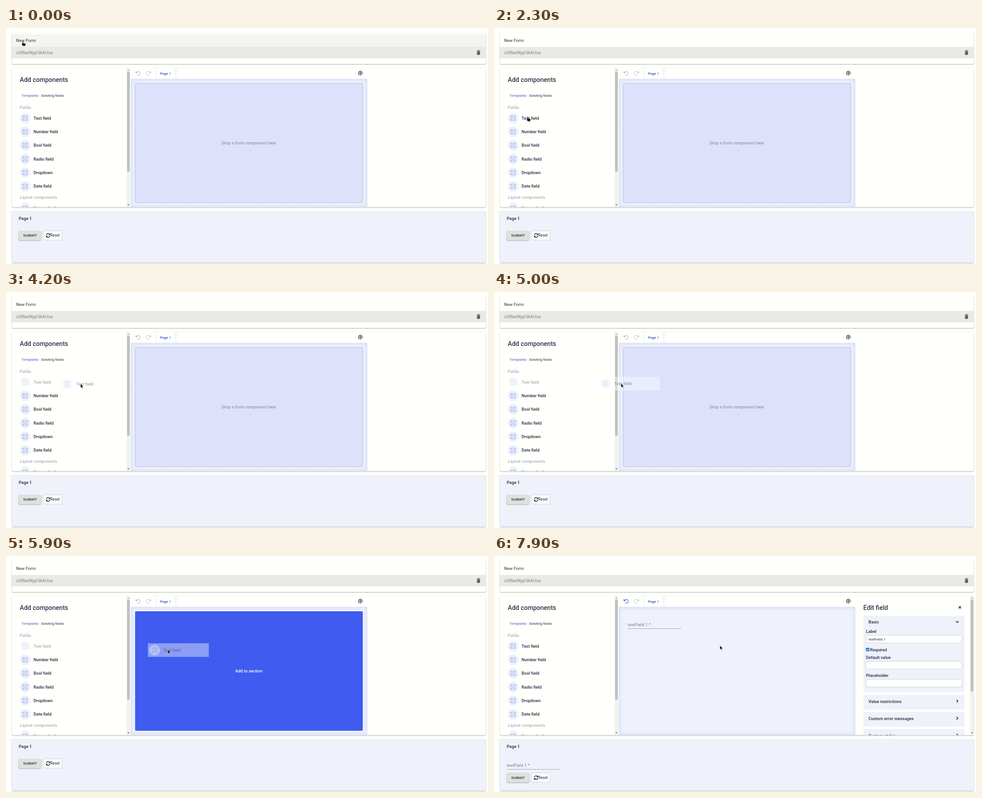
An HTML page for the animation above (8000 ms loop, 1067 by 525 pixels).

```html
<!DOCTYPE html>
<html lang="en">
<head>
<meta charset="utf-8">
<title>Form builder</title>
<style>
  html, body { margin: 0; width: 100%; height: 100%; overflow: hidden; background: #fffffc; }
  svg { display: block; }
  text { font: 400 9.33px Roboto, sans-serif; fill: #242b3a; white-space: pre; }
  .m { font-weight: 500; }
  .s { font-size: 8.1px; }
  .h { font-size: 14px; font-weight: 500; fill: #2c344a; }
  .muted { fill: #abb0bd; }
  .blue { fill: #4258d2; }
  .field { fill: #777a82; letter-spacing: .00938em; }
  .mid { text-anchor: middle; }
  .card { fill: #fffffc; filter: drop-shadow(0 1px 1.3px rgba(0, 0, 0, .34)); }
  .pale { fill: #eff2fb; }
  .line { fill: none; stroke: #111; stroke-width: 1.4; }
  .box { fill: #fffffe; stroke: #c5c8cf; stroke-width: .8; }
</style>
</head>
<body>
<svg width="1067" height="525" viewBox="0 0 1067 525">
  <defs>
    <clipPath id="builder"><rect x="13" y="89" width="1049" height="309.5" rx="2"/></clipPath>
    <clipPath id="canvas"><rect x="276" y="113" width="524" height="285.5"/></clipPath>
    <filter id="soft" x="-10%" y="-10%" width="120%" height="120%"><feGaussianBlur stdDeviation="3"/></filter>
    <linearGradient id="edge"><stop stop-color="#eff2fb"/><stop offset="1" stop-color="#fffffc"/></linearGradient>
    <g id="icon">
      <circle r="12" fill="#eef1fb"/>
      <path d="M-5-5H5V5H-5ZL5 5M5-5L-5 5" fill="none" stroke="#8aa2e6" stroke-width=".9"/>
    </g>
    <g id="undo">
      <path d="M-3.6-1.6A4.3 4.3 0 1 1-2.7 3.3" fill="none" stroke="currentColor" stroke-width="1.1"/>
      <path d="M-4.9-4.6V-.9H-1.2" fill="none" stroke="currentColor" stroke-width="1.1"/>
    </g>
    <g id="scroll">
      <rect width="8" height="309.5" fill="#f1f1ee"/>
      <path d="M2 5.6 4 3.2 6 5.6Z" fill="#8b8b8a"/>
      <path d="M2 303.4H6L4 305.8Z" fill="#3a3a3a"/>
    </g>
  </defs>

  <rect class="card" x="13" y="10" width="1049" height="70" rx="2.5"/>
  <rect id="hover" x="13" y="14" width="1049" height="28" fill="#f4f4f1"/>
  <rect x="13" y="42" width="1049" height="25.7" fill="#e9e9e6"/>
  <text x="22.6" y="31" style="letter-spacing:.00938em">New Form</text>
  <text x="22.6" y="57.8" style="font-size:8.28px;fill:#75767a">cLNSavWpyC4kALfsw</text>
  <path d="M1042.2 50.2h2l.6-.7h2.4l.6.7h2v1.3h-7.6zM1042.7 52.2h6.6v6.4q0 1.2-1.2 1.2h-4.2q-1.2 0-1.2-1.2z" fill="#5b5b5a"/>

  <rect class="card" x="13" y="89" width="1049" height="309.5" rx="2.5"/>
  <g clip-path="url(#builder)">
    <text class="h" x="30.6" y="119.6">Add components</text>
    <text class="s blue" x="34.2" y="152.8">Templates</text>
    <text class="s" x="78.4" y="152.8">Existing fields</text>
    <text class="m muted" x="30.6" y="179.6">Fields</text>
    <g id="items"></g>
    <text class="m muted" x="30.6" y="379.9">Layout components</text>
    <use href="#scroll" x="267" y="89"/>
    <rect x="268" y="97.5" width="6" height="222" fill="#c1c1bf"/>

    <g id="undoBtn" transform="translate(292.5 100.5)"><use href="#undo"/></g>
    <g transform="translate(315.5 100.5) scale(-1 1)" color="#c3c6ce"><use href="#undo"/></g>
    <path d="M332.5 89V113" stroke="#e9ecf5"/>
    <rect x="374" y="89" width="8" height="24" fill="url(#edge)"/>
    <text class="s blue m" x="340.4" y="103.6">Page 1</text>
    <circle class="line" cx="784.3" cy="100.4" r="4.2" style="stroke-width:1.2"/>
    <path class="line" d="M782 100.4h4.6M784.3 98.1v4.6" style="stroke-width:1.2"/>

    <g clip-path="url(#canvas)">
      <rect class="pale" x="276" y="113" width="524" height="286"/>
      <rect x="276" y="113" width="524" height="286" fill="none" stroke="#d9dffb" stroke-width="7" filter="url(#soft)"/>
    </g>
    <g id="empty">
      <rect id="zone" x="285.8" y="123" width="504" height="265.7" rx="2" stroke-width=".9" stroke-dasharray="2.2 1.6"/>
      <text id="hint" class="m mid" x="537.8" y="259.1"></text>
    </g>

    <g class="filled">
      <text class="field" x="296.3" y="155.8">textField 1 *</text>
      <path d="M296.3 161.6h117.7" stroke="#8b8e95" stroke-width=".8"/>
      <text class="h" x="817.6" y="119.6">Edit field</text>
      <path class="line" d="M1028.8 111.8l5 5m0-5l-5 5"/>
      <rect class="pale" x="817.6" y="133" width="224" height="170" rx="3"/>
      <text class="m" x="829" y="150.3">Basic</text>
      <path class="line" d="M1022.6 145l3 3 3-3"/>
      <text class="m" x="823.6" y="170.8">Label</text>
      <rect class="box" x="823.6" y="176.4" width="212" height="17.2" rx="1"/>
      <text class="s" x="829" y="187.8">textField 1</text>
      <rect x="823.4" y="204.3" width="7.6" height="7.6" rx="1.3" fill="#0d73e8"/>
      <path d="M825 208.2l1.7 1.7 2.9-3.5" fill="none" stroke="#fff" stroke-width="1.2"/>
      <text class="m" x="832.6" y="211.7">Required</text>
      <text class="m" x="823.6" y="228.7">Default value</text>
      <rect class="box" x="823.6" y="234.2" width="212" height="17.2" rx="1"/>
      <text class="m" x="823.6" y="269">Placeholder</text>
      <rect class="box" x="823.6" y="274.4" width="212" height="17.2" rx="1"/>
      <g id="sections"></g>
      <use href="#scroll" x="1054" y="89"/>
      <rect x="1055" y="97.5" width="6" height="204" fill="#c1c1bf"/>
    </g>
  </g>

  <rect class="card" x="13" y="407" width="1049" height="115" rx="2.5" style="fill:#eff2fb"/>
  <text class="m" x="28.2" y="427">Page 1</text>
  <g class="filled">
    <text class="field" x="28.2" y="469.2">textField 1 *</text>
    <path d="M28.2 474.6h117.8" stroke="#8b8e95" stroke-width=".8"/>
  </g>
  <g id="buttons">
    <rect class="card" x="28.2" y="451" width="49.6" height="21" rx="2.5" style="fill:#e0e0de"/>
    <text class="s m mid" x="53.2" y="464.4" style="letter-spacing:.02em">SUBMIT</text>
    <rect class="box" x="82.7" y="451" width="41.8" height="21" rx="2.5" style="fill:#fbfbfc"/>
    <path class="line" d="M89.3 460.6A4 4 0 0 1 96.4 459M97.1 462.4A4 4 0 0 1 90 464"/>
    <path d="M97.8 456.7v3.8H94zM88.6 466.3v-3.8h3.8z" fill="#111"/>
    <text x="98.2" y="464.4" style="font-size:8.25px">Reset</text>
  </g>

  <g id="ghost">
    <rect y="-15.2" width="135" height="30.4" fill="#fffffc" opacity=".4"/>
    <g opacity=".42">
      <use href="#icon" x="15"/>
      <text class="m" x="34" y="3.3">Text field</text>
    </g>
  </g>
  <path id="arrow" d="M0 0V9.4L2.2 7.4 3.8 11 5.3 10.3 3.7 6.8H6.7Z" fill="#111" stroke="#fff" stroke-width=".6"/>
  <path id="hand" d="M-1 1Q-1 0 0 0T1 1V4.3L5.5 5.2Q6.7 5.6 6.5 7L5.7 11H.4L-2.6 7.2Q-2.7 5.6-1 6.6Z" fill="#111" stroke="#fff" stroke-width=".5"/>
</svg>
<script>
const LOOP = 8000, STEP = 100;
const $ = id => document.getElementById(id);
const show = (el, on) => { el.style.display = on ? '' : 'none'; };
const move = (el, [x, y]) => el.setAttribute('transform', `translate(${x} ${y})`);

const item = (label, y) =>
  `<g><use href="#icon" x="42.4" y="${y}"/><text class="m" x="61" y="${y + 3.3}">${label}</text></g>`;
const section = (label, i) => {
  const y = 309 + i * 38;
  return `<rect class="pale" x="817.6" y="${y}" width="224" height="32.5" rx="3"/>
    <text class="m" x="829" y="${y + 17.7}">${label}</text>
    <path class="line" d="M1024 ${y + 10.8}l3 3-3 3"/>`;
};
const fields = ['Text field', 'Number field', 'Bool field', 'Radio field', 'Dropdown', 'Date field'];
$('items').innerHTML = fields.map((f, i) => item(f, 200.5 + i * 30.33)).join('') + item('List vertical', 401);
$('sections').innerHTML = ['Value restrictions', 'Custom error messages', 'Custom styles'].map(section).join('');
const textItem = $('items').firstElementChild;
const filled = document.querySelectorAll('.filled');

// Rows: time, x, y
const pointer = [
  [0, 37, 29], [1300, 37, 29], [1400, 41, 40], [1600, 51, 80], [2000, 72, 175], [2200, 75, 195],
  [2400, 74, 198.5], [3300, 74, 198.5], [3400, 75, 202.5], [4200, 165, 204], [4300, 178, 204],
  [5000, 281, 203], [5100, 298, 203], [5600, 353, 208], [5800, 353, 208], [5900, 358, 208],
  [6900, 358, 208], [7800, 462, 202], [7900, 500, 199]
];
const ghost = [
  [3400, 31, 204.3], [4200, 121, 204.5], [5000, 232, 204], [5100, 254, 204], [5600, 314, 209.3]
];
const fade = [[3300, 1], [3400, .65], [3600, .38], [6100, .38], [6200, .6], [6300, .85], [6500, 1]];

function at(rows, t) {
  const i = rows.findIndex(r => r[0] > t);
  if (i < 0) return rows[rows.length - 1].slice(1);
  if (i === 0) return rows[0].slice(1);
  const a = rows[i - 1], b = rows[i];
  const k = (t - a[0]) / (b[0] - a[0]);
  return a.slice(1).map((v, j) => v + (b[j + 1] - v) * k);
}

function draw(now) {
  const t = Math.floor(now % LOOP / STEP) * STEP;
  const tip = at(pointer, t);
  const over = t >= 5100, added = t >= 6100;
  const isHand = t < 3500 && (tip[1] < 69 || tip[1] > 186);

  show($('hover'), t < 1500);
  show($('hand'), isHand);
  show($('arrow'), !isHand);
  move($(isHand ? 'hand' : 'arrow'), tip);

  show($('ghost'), t >= 3400 && !added);
  move($('ghost'), at(ghost, t));
  textItem.setAttribute('opacity', at(fade, t)[0]);

  show($('empty'), !added);
  $('zone').setAttribute('fill', over ? '#3f5bf0' : '#dde1fb');
  $('zone').setAttribute('stroke', over ? 'none' : '#8f98b4');
  $('hint').textContent = over ? 'Add to section' : 'Drop a form component here';
  $('hint').style.fill = over ? '#fff' : '#8f97ae';

  filled.forEach(el => show(el, added));
  $('undoBtn').setAttribute('color', added ? '#4258d2' : '#b6bac6');
  move($('buttons'), [0, added ? 31.6 : 0]);
}

function tick() {
  draw(performance.now());
  requestAnimationFrame(tick);
}
tick();
</script>
</body>
</html>
```
